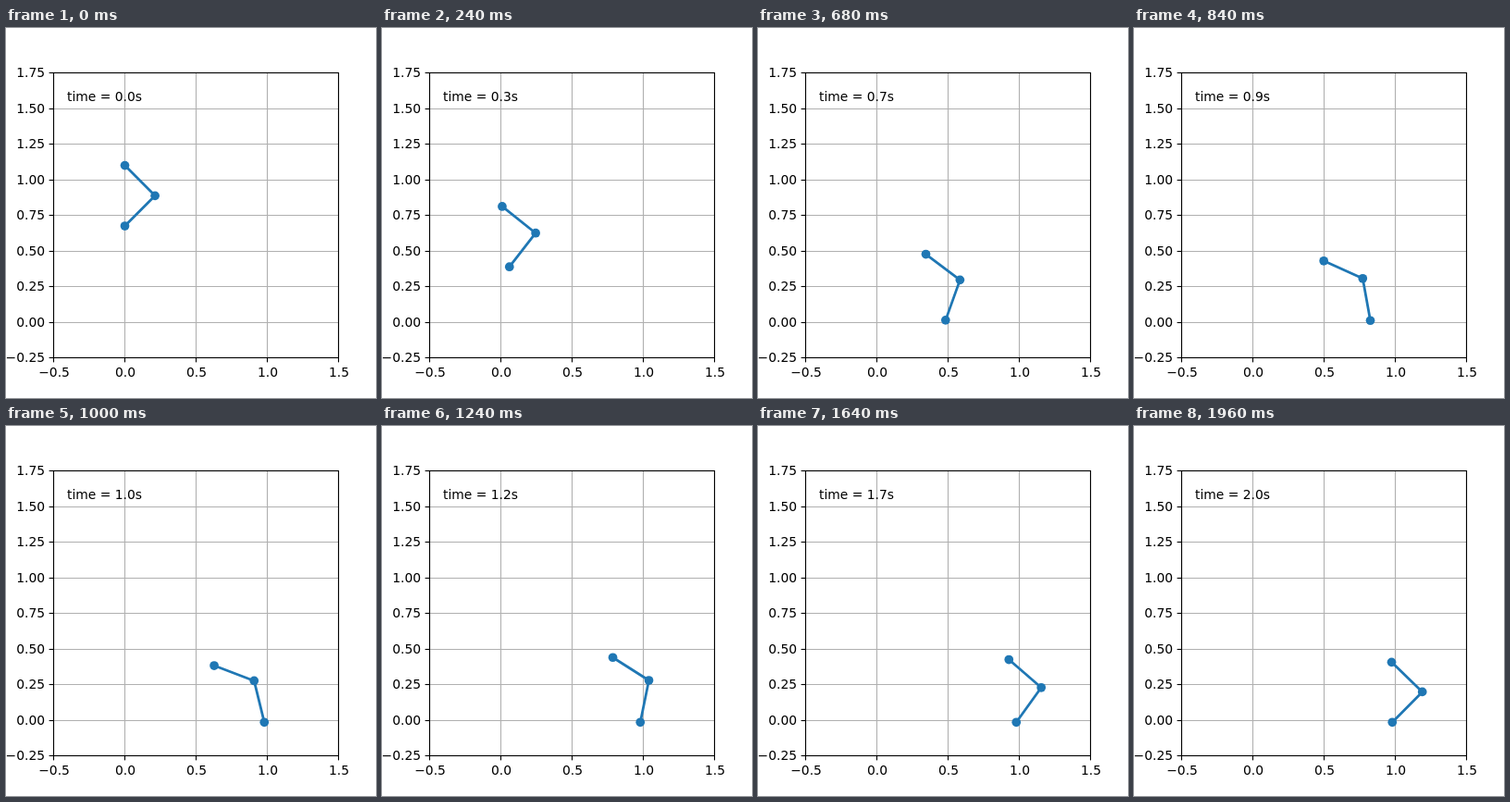
Write an HTML page that moves like this. It is 400 px wide and 400 px high and loops after 2000 ms.

```html
<!DOCTYPE html>
<html lang="en">
<head>
<meta charset="utf-8">
<title>Hopping leg</title>
<style>
  html, body { margin: 0; width: 100%; height: 100%; overflow: hidden; background: #fff; }
  svg { display: block; width: 400px; height: 400px; }
  text { font: 13.89px "DejaVu Sans", sans-serif; fill: #000; }
  .grid { stroke: #b0b0b0; stroke-width: 1.11; }
  .axis { stroke: #000; stroke-width: 1.11; fill: none; }
  .leg { stroke: #1f77b4; stroke-width: 2.78; fill: none; stroke-linejoin: round; }
  .joint { fill: #1f77b4; }
</style>
</head>
<body>
<svg id="plot" viewBox="0 0 400 400"></svg>
<script>
const svg = document.getElementById('plot');
const LEFT = 51, RIGHT = 359, TOP = 48, BOTTOM = 356, UNIT = 154;
const STEP = 40, STEPS = 50, LINK = 0.3;

function add(tag, attrs, text) {
  const el = document.createElementNS('http://www.w3.org/2000/svg', tag);
  for (const k in attrs) el.setAttribute(k, attrs[k]);
  if (text) el.textContent = text;
  return svg.appendChild(el);
}
const line = (cls, x1, y1, x2, y2) => add('line', { class: cls, x1, y1, x2, y2 });
const snap = v => Math.floor(v + 0.5) + 0.5;
const label = (v, digits) => v.toFixed(digits).replace('-', '\u2212');
const px = x => LEFT + 0.5 + (x + 0.5) * UNIT;
const py = y => BOTTOM + 0.5 - (y + 0.25) * UNIT;

// Ticks from a start value, each with its snapped pixel position.
const ticks = (count, from, gap, place) => Array.from({ length: count }, (_, i) => {
  const v = from + i * gap;
  return [v, snap(place(v) - 0.5)];
});
const xTicks = ticks(5, -0.5, 0.5, px);
const yTicks = ticks(9, -0.25, 0.25, py);

for (const [, x] of xTicks) line('grid', x, TOP, x, BOTTOM);
for (const [, y] of yTicks) line('grid', LEFT, y, RIGHT, y);

const leg = add('polyline', { class: 'leg' });
const joints = [0, 1, 2].map(() => add('circle', { class: 'joint', r: 4.86 }));

for (const [v, x] of xTicks) {
  line('axis', x, BOTTOM + 0.5, x, BOTTOM + 5.4);
  add('text', { x: x + 0.6, y: 377, 'text-anchor': 'middle' }, label(v, 1));
}
for (const [v, y] of yTicks) {
  line('axis', LEFT - 4.4, y, LEFT + 0.5, y);
  add('text', { x: 42.1, y: Math.floor(y) + 5, 'text-anchor': 'end' }, label(v, 2));
}
add('rect', { class: 'axis', x: LEFT + 0.5, y: TOP + 0.5, width: RIGHT - LEFT, height: BOTTOM - TOP });
const clock = add('text', { x: 66, y: 79 });

const clamp = u => Math.min(1, Math.max(0, u));
const mix = (a, b, u) => a + (b - a) * u;
const mixPoint = (a, b, u) => a.map((v, i) => mix(v, b[i], u));
const ease = u => u * u * (3 - 2 * u);

// Positions in plot units; LANDED and SETTLED are step numbers.
const LANDED = 9.4, PUSH_OFF = 11, SETTLED = 24.8;
const hipStart = [0, 1.1], footStart = [0, 0.675];
const footLanded = [0.148, -0.029], footEnd = [0.979, -0.015];
const hipPath = [ // step, x, y
  [11, 0.023, 0.393], [17, 0.344, 0.477], [25, 0.627, 0.383],
  [31, 0.786, 0.44], [41, 0.927, 0.425], [49, 0.974, 0.407]
];

const slope = (i, c) =>
  (hipPath[i + 1][c] - hipPath[i][c]) / (hipPath[i + 1][0] - hipPath[i][0]);

// Tangent that never overshoots; at rest at both ends.
function tangent(i, c) {
  if (i === 0 || i === hipPath.length - 1) return 0;
  const a = slope(i - 1, c), b = slope(i, c);
  return a * b > 0 ? 2 * a * b / (a + b) : 0;
}

function glide(n, c) {
  let i = 0;
  while (i < hipPath.length - 2 && n >= hipPath[i + 1][0]) i++;
  const p = hipPath[i], q = hipPath[i + 1], d = q[0] - p[0], u = (n - p[0]) / d, w = 1 - u;
  return mix(p[c], q[c], ease(u)) + d * u * w * (w * tangent(i, c) - u * tangent(i + 1, c));
}

const fall = n => clamp(n / LANDED) ** 2;

function hipAt(n) {
  if (n < PUSH_OFF) return mixPoint(hipStart, hipPath[0].slice(1), fall(n));
  return [glide(n, 1), glide(n, 2)];
}

function footAt(n) {
  if (n < PUSH_OFF) return mixPoint(footStart, footLanded, fall(n));
  const u = clamp((n - PUSH_OFF) / (SETTLED - PUSH_OFF));
  const [x, y] = mixPoint(footLanded, footEnd, ease(u));
  return [x, y + 0.038 * Math.sin(Math.PI * u)];
}

function kneeOf([hx, hy], [fx, fy]) {
  const dx = fx - hx, dy = fy - hy, d = Math.hypot(dx, dy);
  const bend = Math.sqrt(Math.max(0, LINK * LINK - d * d / 4)) / d;
  return [(hx + fx) / 2 - dy * bend, (hy + fy) / 2 + dx * bend];
}

// Simulated time runs slightly unevenly over the two seconds.
function secondsAt(n) {
  const u = n / (STEPS - 1);
  return 2 * u + 0.025 * Math.sin(2 * Math.PI * u);
}

function draw(n) {
  const hip = hipAt(n), foot = footAt(n);
  const points = [hip, kneeOf(hip, foot), foot].map(([x, y]) => [px(x), py(y)]);
  leg.setAttribute('points', points.join(' '));
  points.forEach(([x, y], i) => {
    joints[i].setAttribute('cx', x);
    joints[i].setAttribute('cy', y);
  });
  clock.textContent = `time = ${secondsAt(n).toFixed(1)}s`;
}

const start = performance.now();
function tick() {
  draw(Math.floor((performance.now() - start) / STEP) % STEPS);
  requestAnimationFrame(tick);
}
tick();
</script>
</body>
</html>
```
